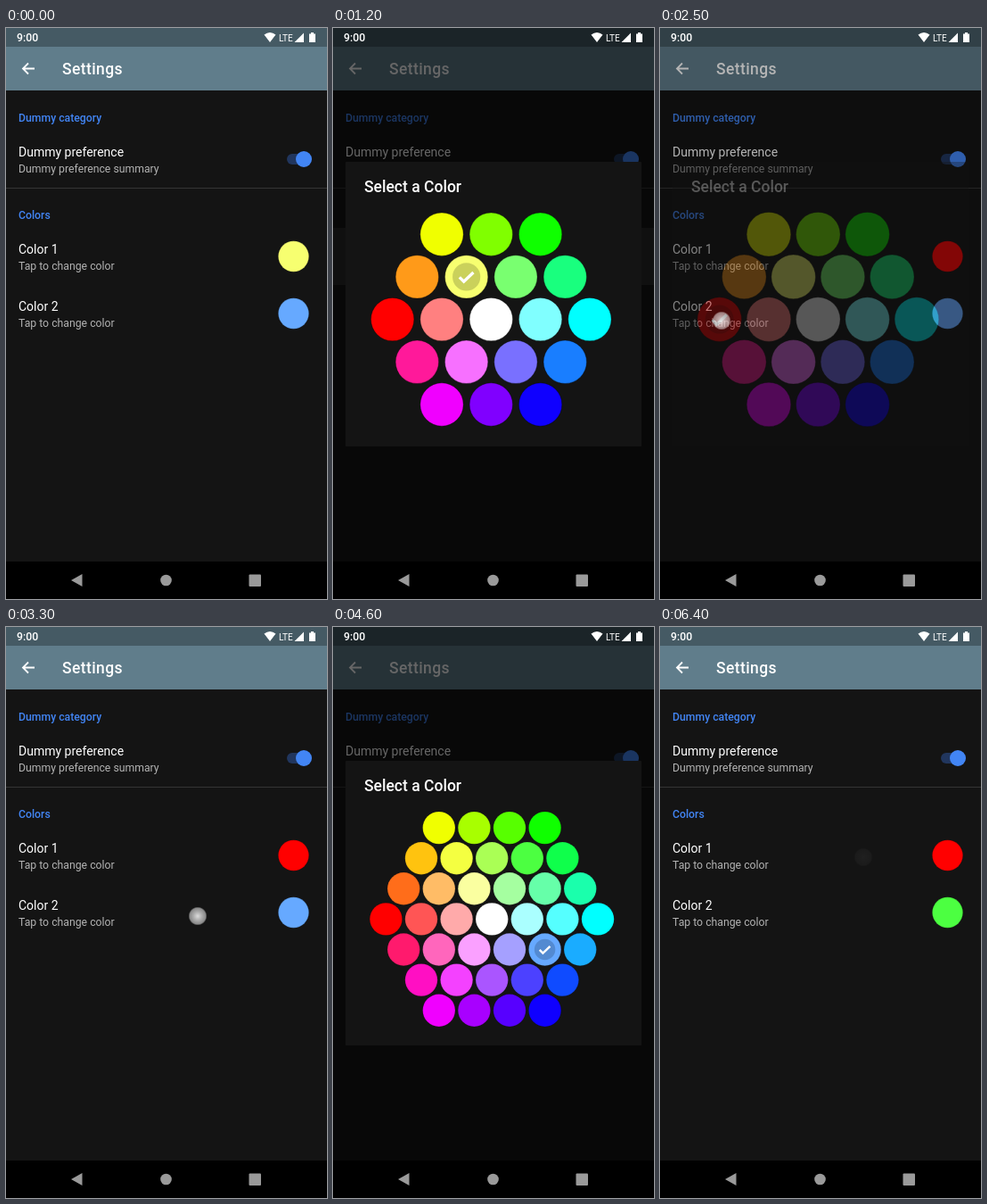
Animation, 360 px wide and 640 px high, one loop 6.6 s. Source, as an HTML page:

```html
<!DOCTYPE html>
<html lang="en">
<head>
<meta charset="utf-8">
<title>Color settings</title>
<style>
  html, body { margin: 0; width: 100%; height: 100%; overflow: hidden; background: #000; }
  svg { display: block; width: 100%; height: 100%; }
  text { font-family: Roboto, sans-serif; fill: #fff; white-space: pre; }
  .bar { font-size: 17.5px; font-weight: 500; }
  .cat { font-size: 12.26px; font-weight: 500; fill: #4285f4; }
  .pref { font-size: 14px; }
  .sum { font-size: 12.26px; fill: #b3b3b3; }
</style>
</head>
<body>
<svg viewBox="0 0 360 640" xmlns="http://www.w3.org/2000/svg">
  <defs>
    <radialGradient id="touch">
      <stop offset="0" stop-color="#fff" stop-opacity=".85"/>
      <stop offset=".45" stop-color="#fff" stop-opacity=".65"/>
      <stop offset=".85" stop-color="#fff" stop-opacity=".5"/>
      <stop offset="1" stop-color="#fff" stop-opacity="0"/>
    </radialGradient>
    <clipPath id="row1"><rect y="224" width="360" height="64"/></clipPath>
    <clipPath id="row2"><rect y="288" width="360" height="64"/></clipPath>
  </defs>

  <rect width="360" height="598" fill="#141414"/>
  <rect width="360" height="21" fill="#455a64"/>
  <rect y="21" width="360" height="49" fill="#607d8b"/>
  <path d="M32 45.500H19.500M25 39.500L19 45.500L25 51.500" fill="none" stroke="#fff" stroke-width="1.800"/>
  <text class="bar" x="63" y="52" letter-spacing=".4">Settings</text>

  <g clip-path="url(#row1)"><circle id="ripple1" cy="256" fill="#fff"/></g>
  <g clip-path="url(#row2)"><circle id="ripple2" cy="320" fill="#fff"/></g>

  <text class="cat" x="14" y="104.500">Dummy category</text>
  <text class="pref" x="14" y="144">Dummy preference</text>
  <text class="sum" x="14" y="161.500">Dummy preference summary</text>
  <rect x="315" y="141" width="27" height="12" rx="6" fill="#21365e"/>
  <circle cx="334" cy="147" r="9" fill="#4285f4"/>
  <rect y="179" width="360" height="1" fill="#343434"/>
  <text class="cat" x="14" y="213.500">Colors</text>
  <text class="pref" x="14" y="253">Color 1</text>
  <text class="sum" x="14" y="270.500">Tap to change color</text>
  <text class="pref" x="14" y="317">Color 2</text>
  <text class="sum" x="14" y="334.500">Tap to change color</text>
  <g stroke="#000" stroke-opacity=".2">
    <circle id="color1" cx="322.500" cy="256" r="17.200"/>
    <circle id="color2" cx="322.500" cy="320" r="17.200"/>
  </g>

  <rect id="dim" width="360" height="598"/>
  <g id="dialog">
    <rect x="14" y="150" width="332" height="319" rx="1" fill="#141414"/>
    <text class="bar" x="35" y="184">Select a Color</text>
    <g id="grid1"></g>
    <g id="grid2"></g>
  </g>

  <text x="12" y="15" font-size="12.260" font-weight="500">9:00</text>
  <text x="306" y="14.500" font-size="10">LTE</text>
  <path d="M289.500 7.500Q296 2.500 302.500 7.500L296 16ZM334 5.500V16H323.500ZM340 6.500h2v-1.500h3v1.500h2V16h-7Z" fill="#fff"/>
  <rect y="598" width="360" height="42"/>
  <g fill="#9a9a9a">
    <path d="M73 619L85.500 612V626Z"/>
    <circle cx="179.500" cy="619" r="6.300"/>
    <rect x="272.500" y="612.500" width="13.500" height="13.500" rx="1"/>
  </g>
  <circle id="pointer" r="10.500" fill="url(#touch)"/>
</svg>
<script>
const LOOP = 6600, STEP = 100;
const $ = id => document.getElementById(id);
const clamp = v => Math.max(0, Math.min(1, v));
const ramp = (t, start, len) => clamp((t - start) / len);
const easeOut = p => 1 - (1 - p) ** 2;

function set(el, attrs) {
  for (const k in attrs) el.setAttribute(k, attrs[k]);
  return el;
}

function add(parent, tag, attrs) {
  const el = document.createElementNS('http://www.w3.org/2000/svg', tag);
  parent.appendChild(el);
  return set(el, attrs);
}

// Hue follows the angle from the left, saturation the distance from the middle.
function hexColor(col, row, size) {
  const hue = (Math.atan2(-row, -col) * 180 / Math.PI + 360) % 360;
  const sat = Math.min(1, Math.hypot(col, row) / size);
  const channel = n => {
    const k = (n + hue / 60) % 6;
    return Math.round(255 * (1 - sat * clamp(Math.min(k, 4 - k))));
  };
  return `rgb(${channel(5)},${channel(3)},${channel(1)})`;
}

function makeGrid(group, { size, cx, cy, dx, dy, r, edge }) {
  const cells = [];
  const place = (col, row) => [cx + col * dx, cy + row * dy];
  for (let row = -size; row <= size; row++) {
    const half = size - Math.abs(row) / 2;
    for (let col = -half; col <= half; col++) {
      const [x, y] = place(col, row);
      const el = add(group, 'circle', {
        cx: x, cy: y, fill: hexColor(col, row, size), stroke: '#000', 'stroke-opacity': edge
      });
      cells.push(el);
    }
  }
  const mark = add(group, 'g', {});
  add(mark, 'circle', { r: 16, 'fill-opacity': .18 });
  add(mark, 'path', { d: 'M-8 0.500L-3 5.500L8 -5', fill: 'none', stroke: '#fff', 'stroke-width': 3.4 });
  return (scale, [col, row]) => {
    for (const el of cells) set(el, { r: r * scale });
    const [x, y] = place(col, row);
    set(mark, { transform: `translate(${x} ${y}) scale(${scale * r / 24.8})` });
  };
}

const visits = [
  {
    open: 980, close: 2395, ripple: 800, touchX: 113, size: 2, from: [-.5, -1], to: [-2, 0],
    group: $('grid1'), swatch: $('color1'), wave: $('ripple1'),
    draw: makeGrid($('grid1'), { size: 2, cx: 177.3, cy: 326.6, dx: 55.3, dy: 47.7, r: 24.8, edge: .35 })
  },
  {
    open: 3595, close: 5170, ripple: 3320, touchX: 215, size: 3, from: [1.5, 1], to: [1, -2],
    group: $('grid2'), swatch: $('color2'), wave: $('ripple2'),
    draw: makeGrid($('grid2'), { size: 3, cx: 178.2, cy: 327.4, dx: 39.6, dy: 34.1, r: 18.2, edge: .15 })
  }
];

// `rest` is the faint trace left after the last tap.
const taps = [
  { x: 113, y: 258, down: 600, up: 870, rest: 0 },
  { x: 69, y: 328, down: 2150, up: 2490, rest: 0 },
  { x: 215, y: 324, down: 3200, up: 3450, rest: 0 },
  { x: 228, y: 258, down: 4900, up: 5250, rest: .06 }
];

function drawVisit(v, t) {
  const pick = t >= v.close ? v.to : v.from;
  set(v.swatch, { fill: hexColor(...pick, v.size) });

  const grow = easeOut(ramp(t, v.ripple, 270));
  const fade = 1 - ramp(t, v.ripple + 270, 210);
  set(v.wave, {
    cx: v.touchX + (180 - v.touchX) * grow,
    r: 183 * grow,
    'fill-opacity': t >= v.ripple ? .22 * fade : 0
  });

  const shown = t >= v.open && t < v.close + 210;
  set(v.group, { display: shown && t > v.open + 125 ? 'inline' : 'none' });
  if (!shown) return { alpha: 0, dim: 0 };
  v.draw(easeOut(ramp(t, v.open + 60, 190)), pick);
  return {
    alpha: easeOut(ramp(t, v.open, 150)) * (1 - ramp(t, v.close, 150)),
    dim: .6 * ramp(t, v.open, 160) * (1 - ramp(t, v.close, 205))
  };
}

function render(t) {
  const states = visits.map(v => drawVisit(v, t));
  set($('dialog'), { opacity: Math.max(...states.map(s => s.alpha)) });
  set($('dim'), { 'fill-opacity': Math.max(...states.map(s => s.dim)) });

  const tap = taps.filter(p => t >= p.down).pop();
  const alpha = tap ? Math.max(tap.rest, 1 - ramp(t, tap.up, 180)) : 0;
  set($('pointer'), { cx: tap ? tap.x : 0, cy: tap ? tap.y : 0, opacity: alpha });
}

const begin = performance.now();
function tick() {
  const t = (performance.now() - begin) % LOOP;
  render(Math.min(Math.floor(t / STEP) * STEP, LOOP - 2 * STEP));
  requestAnimationFrame(tick);
}
tick();
</script>
</body>
</html>
```
